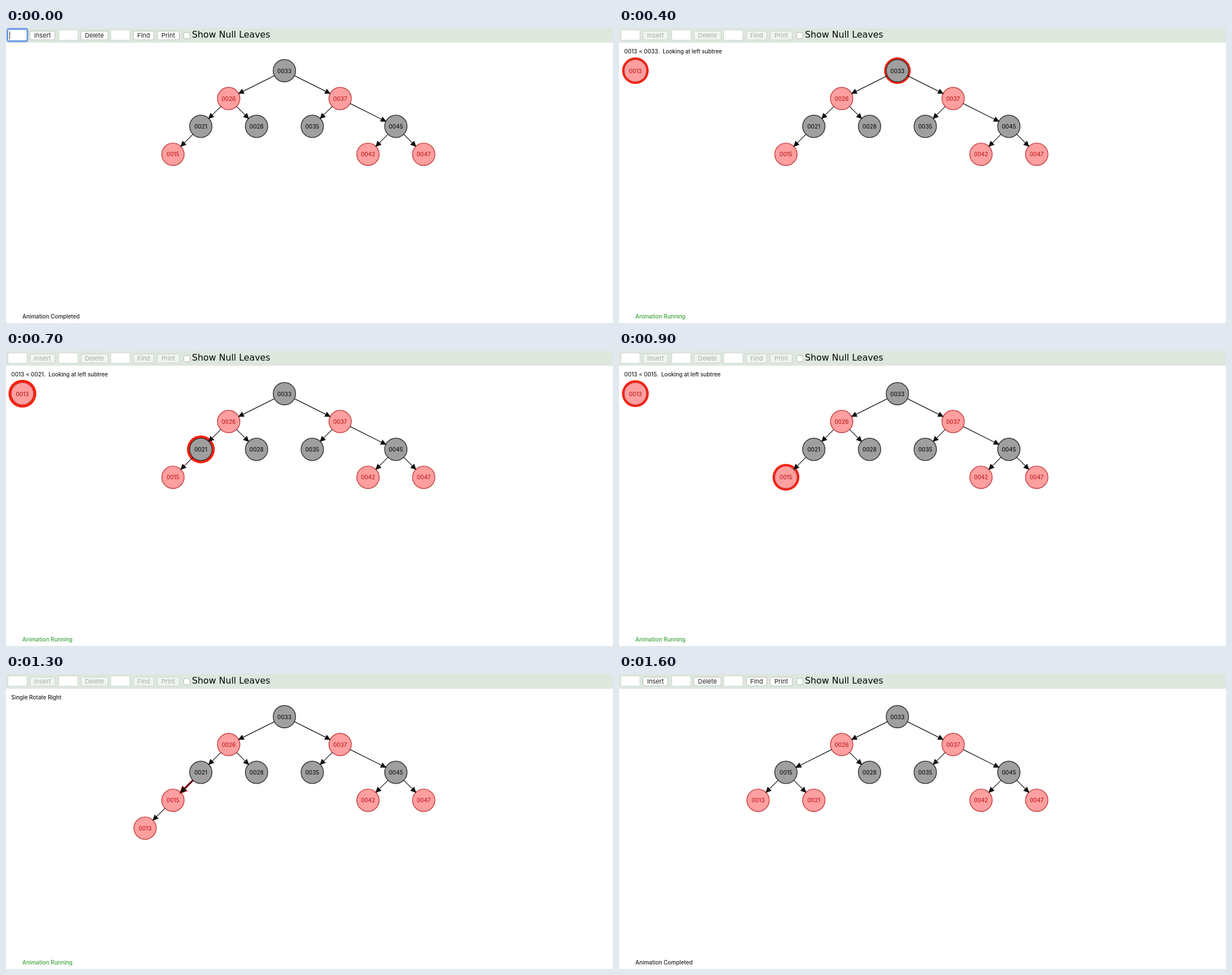
Write an HTML page with a canvas that moves like this. It is 1074x522 px and loops after 2 s.

```html
<!DOCTYPE html>
<html lang="en">
<head>
<meta charset="utf-8">
<title>Red-black tree insertion</title>
<style>
html, body { margin: 0; width: 100%; height: 100%; overflow: hidden; background: #fff; }
canvas { display: block; }
</style>
</head>
<body>
<canvas id="stage" width="1074" height="522"></canvas>
<script>
const ctx = document.getElementById('stage').getContext('2d');
const LOOP = 2000, TICK = 100, R = 19.8, GAP = 49.3;
const SANS = 'Inter, "Liberation Sans", sans-serif';
const WIDE = '"DejaVu Sans", sans-serif';
const HOT = '#fb200c';
const BLACK = { fill: '#9f9f9f', line: '#303030', text: '#151515' };
const RED = { fill: '#ff9f9f', line: '#c73c3c', text: '#bd1f24' };

const at = (col, row) => ({ x: 492.6 + GAP * col, y: 75.5 + GAP * row });
const mix = (a, b, k) => ({ x: a.x + (b.x - a.x) * k, y: a.y + (b.y - a.y) * k });
const START = { x: 29, y: 75.5 };

// key: [column, row, colour]
const TREE = {
  33: [0, 0, BLACK], 26: [-2, 1, RED], 37: [2, 1, RED],
  21: [-3, 2, BLACK], 28: [-1, 2, BLACK], 35: [1, 2, BLACK], 45: [4, 2, BLACK],
  15: [-4, 3, RED], 42: [3, 3, RED], 47: [5, 3, RED]
};
const FIXED = [[33, 26], [33, 37], [26, 28], [37, 35], [37, 45], [45, 42], [45, 47]];
const label = key => String(key).padStart(4, '0');

function text(str, x, y, font, color, align = 'left') {
  ctx.font = font;
  ctx.fillStyle = color;
  ctx.textAlign = align;
  ctx.fillText(str, x, y);
}

function disc(p, r, fill, line, width) {
  ctx.beginPath();
  ctx.arc(p.x, p.y, r, 0, 7);
  if (fill) {
    ctx.fillStyle = fill;
    ctx.fill();
  }
  if (line) {
    ctx.strokeStyle = line;
    ctx.lineWidth = width;
    ctx.stroke();
  }
}

function box(x, y, w, h, r, fill, line) {
  ctx.beginPath();
  ctx.roundRect(x, y, w, h, r);
  ctx.fillStyle = fill;
  ctx.fill();
  ctx.strokeStyle = line;
  ctx.lineWidth = 1;
  ctx.stroke();
}

function arrow(a, b, color, width) {
  const ang = Math.atan2(b.y - a.y, b.x - a.x);
  const dx = Math.cos(ang), dy = Math.sin(ang);
  const tx = b.x - dx * R, ty = b.y - dy * R;
  const bx = tx - dx * 8.5, by = ty - dy * 8.5;
  ctx.strokeStyle = ctx.fillStyle = color;
  ctx.lineWidth = width;
  ctx.beginPath();
  ctx.moveTo(a.x + dx * R, a.y + dy * R);
  ctx.lineTo(bx, by);
  ctx.stroke();
  ctx.beginPath();
  ctx.moveTo(tx, ty);
  ctx.lineTo(bx - dy * 4, by + dx * 4);
  ctx.lineTo(bx + dy * 4, by - dx * 4);
  ctx.closePath();
  ctx.fill();
  ctx.stroke();
}

function button(str, x, w, off) {
  box(x + .5, 5.5, w - 1, 15.5, 3, off ? '#f0f4f0' : '#fff', off ? '#cdd5ce' : '#b9c0ba');
  text(str, x + w / 2, 17.4, '11px ' + SANS, off ? '#a6aca7' : '#1c1c1c', 'center');
}

function toolbar(s) {
  ctx.fillStyle = '#dde7de';
  ctx.fillRect(0, 0, 1074, 26);
  for (const x of [3, 93, 185]) box(x + .5, 3.5, 33.5, 18, 0, '#fff', '#d3dbd4');
  if (s.typed !== undefined) {
    ctx.beginPath();
    ctx.roundRect(2.5, 1.5, 35.5, 22, 3);
    ctx.strokeStyle = '#6f9fe8';
    ctx.lineWidth = 3;
    ctx.stroke();
    text(s.typed, 6, 17.4, '11px ' + SANS, '#111');
    ctx.fillStyle = '#222';
    ctx.fillRect(6 + ctx.measureText(s.typed).width, 6, 1, 14);
  }
  button('Insert', 42, 45, s.busy);
  button('Delete', 132, 49, s.busy);
  button('Find', 225, 37, s.busy);
  button('Print', 267, 40, s.busy);
  box(314.5, 8, 11, 11, 2.5, '#fff', '#b4bbb5');
  text('Show Null Leaves', 329, 17, '15.8px ' + WIDE, '#050505');
}

const idle = typed => ({ typed });
const busy = (note, more) => ({ busy: true, note, fresh: START, ...more });
const less = key => `0013 < ${label(key)}.  Looking at left subtree`;
const compare = (key, ring) => busy(less(key), { hot: key, ring });
const descend = (from, to, k) => busy(less(from), { walk: [from, to, k] });
const LEAF = at(-5, 4);
const insert = k => busy('Found null tree (or phantom leaf), inserting element',
  { fresh: mix(START, LEAF, k), linked: true });
const rotate = () => busy('Single Rotate Right', { fresh: LEAF, linked: true, hotEdge: true });
const turn = k => ({ turn: k, linked: true, fresh: mix(LEAF, at(-5, 3), k) });

const STEPS = [
  idle(''), idle('1'), idle('13'), busy('Inserting 0013'),
  compare(33, 23.5), descend(33, 26, .7), compare(26, 24.8),
  compare(21, 24.6), descend(21, 15, .3), compare(15, 23.7),
  insert(.7), insert(1), rotate(), rotate(),
  { ...turn(.5), busy: true }, { ...turn(1), busy: true }, turn(1)
];

function layout(s) {
  const nodes = {};
  for (const key in TREE) {
    const [col, row, color] = TREE[key];
    nodes[key] = { ...at(col, row), color };
  }
  if (s.turn !== undefined) {
    nodes[21] = { ...mix(nodes[21], at(-3, 3), s.turn), color: RED };
    nodes[15] = { ...mix(nodes[15], at(-4, 2), s.turn), color: BLACK };
  }
  if (s.fresh) nodes[13] = { ...s.fresh, color: RED };
  return nodes;
}

function draw(s) {
  const nodes = layout(s);
  ctx.fillStyle = '#fff';
  ctx.fillRect(0, 0, 1074, 522);
  toolbar(s);

  if (s.hot) for (const key of [13, s.hot]) disc(nodes[key], s.ring, HOT);

  for (const key in nodes) {
    const n = nodes[key];
    disc(n, R, n.color.fill, n.color.line, 1.4);
    text(label(key), n.x, n.y + 4, '500 9.86px ' + SANS, n.color.text, 'center');
  }

  const edges = FIXED.concat(s.turn === undefined ? [[26, 21], [21, 15]] : [[26, 15], [15, 21]]);
  if (s.linked) edges.push([15, 13]);
  if (s.hotEdge) arrow(nodes[21], nodes[15], '#e8232a', 3.6);
  for (const [a, b] of edges) {
    arrow(nodes[a], nodes[b], '#111', s.hotEdge && a === 21 ? 1.8 : 1.2);
  }

  if (s.walk) {
    const [a, b, k] = s.walk;
    disc(mix(nodes[a], nodes[b], k), R, null, '#2b8a2b', 4);
  }
  if (s.note) text(s.note, 9.3, 45.2, '500 9.86px ' + SANS, '#222');
  text(s.busy ? 'Animation Running' : 'Animation Completed', 29, 513.8,
    '500 9.86px ' + SANS, s.busy ? '#3da338' : '#222');
}

const began = performance.now();
function frame() {
  const t = (performance.now() - began) % LOOP;
  draw(STEPS[Math.min(Math.floor(t / TICK), STEPS.length - 1)]);
  requestAnimationFrame(frame);
}
frame();
</script>
</body>
</html>
```
